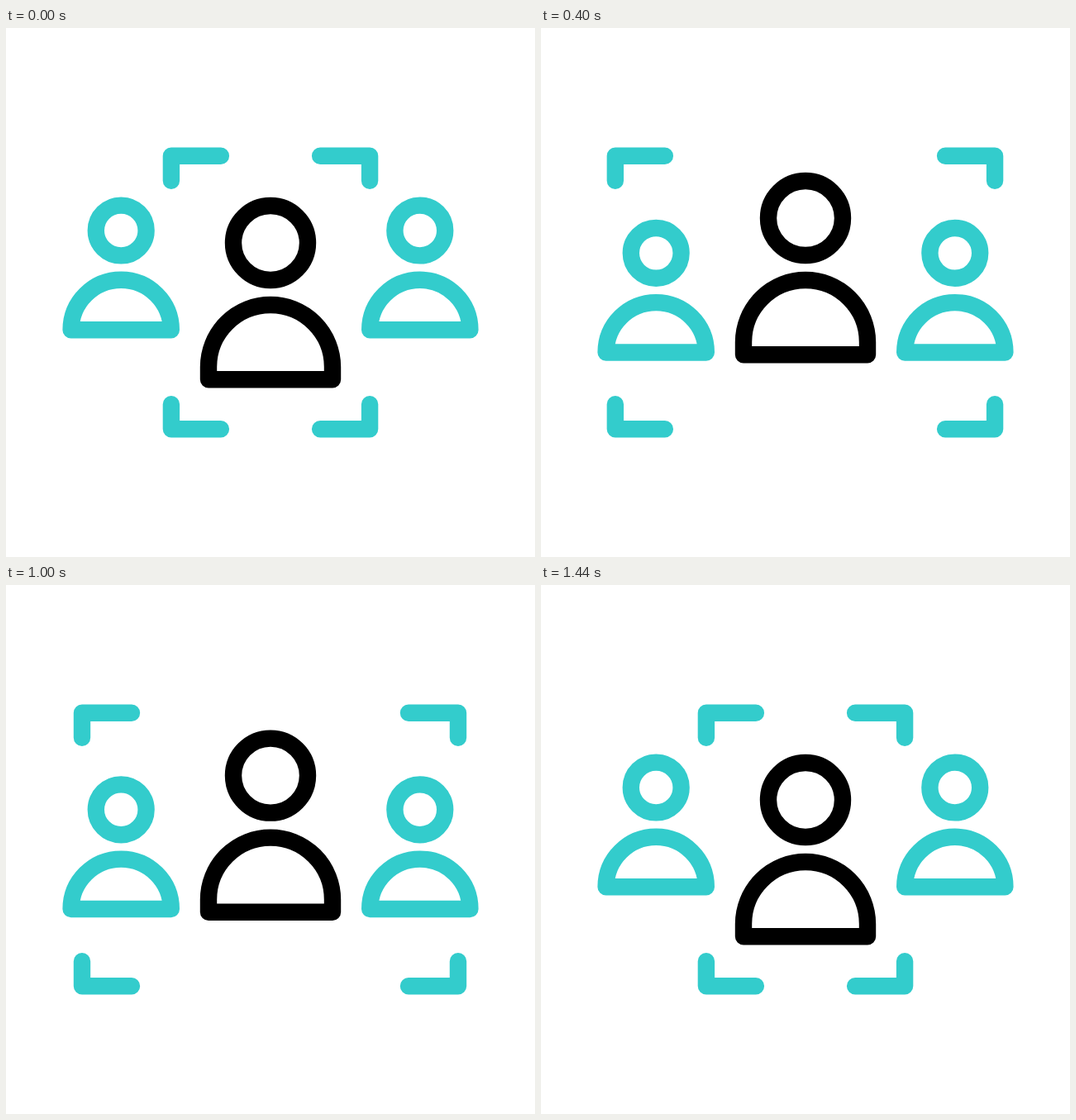
Animation, 640 px wide and 640 px high, one loop 1480 ms. Source, as an HTML page:

```html
<!DOCTYPE html>
<html lang="en">
<head>
<meta charset="utf-8">
<title>Group focus</title>
<style>
  html, body { margin: 0; width: 100%; height: 100%; overflow: hidden; background: #fff; }
  svg { display: block; width: 100%; height: 100%; }
  .ink { fill: none; stroke: #3cc; stroke-width: 20.4; stroke-linecap: round; stroke-linejoin: round; }
  .lead { stroke: #000; }
</style>
</head>
<body>
<svg viewBox="0 0 640 640" class="ink">
  <defs>
    <g id="person">
      <circle cy="245" r="30.4"/>
      <path d="M-60.6 365.2a60.6 60.4 0 0 1 121.2 0Z"/>
    </g>
    <path id="bracket" d="M0 184.8V154.8H60M0 455.2V485.2H60"/>
  </defs>
  <g id="left"><use href="#bracket"/></g>
  <g id="right"><use href="#bracket"/></g>
  <g id="sides">
    <use href="#person" x="139.2"/>
    <use href="#person" x="500.8"/>
  </g>
  <g id="lead" class="lead">
    <circle cx="320" cy="260" r="45"/>
    <path d="M245 425.2V410a75 75 0 0 1 150 0V425.2Z"/>
  </g>
  <g id="lines">
    <path data-x="81.2"/>
    <path data-x="261.2" class="lead"/>
    <path data-x="443.2"/>
  </g>
</svg>
<script>
const LOOP = 1480, STEP = 40;
const $ = id => document.getElementById(id);
const lines = [...$('lines').children];

// Bezier easing with flat ends: control points (x1, 0) and (x2, 1)
const ease = (x1, x2) => u => {
  if (u <= 0) return 0;
  if (u >= 1) return 1;
  let lo = 0, hi = 1, s;
  for (let i = 0; i < 24; i++) {
    s = (lo + hi) / 2;
    const x = 3 * x1 * s * (1 - s) ** 2 + 3 * x2 * s * s * (1 - s) + s ** 3;
    if (x < u) lo = s; else hi = s;
  }
  return s * s * (3 - 2 * s);
};
const spread = ease(.2, .6), gather = ease(.18, .57), trace = ease(.22, .64);
const span = (t, from, to) => (t - from) / (to - from);
const move = (id, x, y) => $(id).setAttribute('transform', `translate(${x} ${y})`);

function draw(t) {
  const open = spread(span(t, 120, 440)) - gather(span(t, 960, 1440));
  const drawn = trace(span(t, 440, 760)) - trace(span(t, 760, 960));
  move('left', 199.9 - 113.5 * open, 0);
  $('right').setAttribute('transform', `translate(${440.1 + 112.4 * open} 0) scale(-1 1)`);
  move('sides', 0, 28.2 * open);
  move('lead', 0, -30.9 * open);
  $('lines').style.display = drawn > 0 ? '' : 'none';
  for (const l of lines) l.setAttribute('d', `M${l.dataset.x} 424.3h${120 * drawn}`);
}

function tick() {
  const t = (performance.now() + 1) % LOOP;
  draw(Math.floor(t / STEP) * STEP);
  requestAnimationFrame(tick);
}
tick();
</script>
</body>
</html>
```
